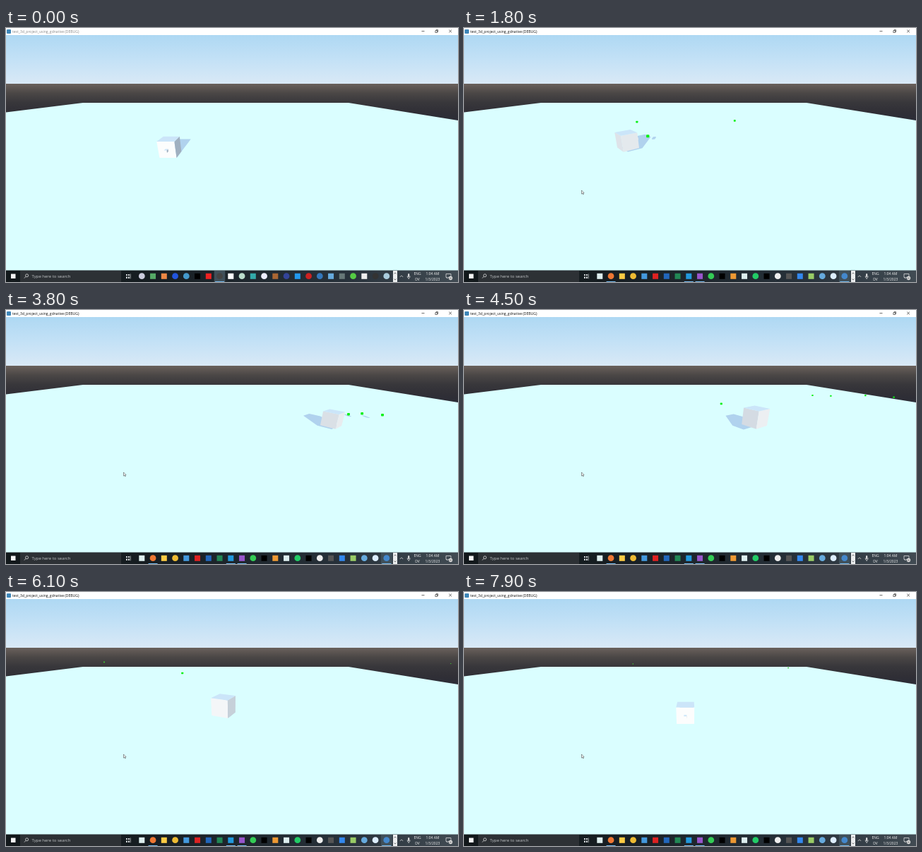
Recreate the animation shown at these times as an HTML page with a canvas. Size 640 px wide and 360 px high, loop 8 s.

```html
<!DOCTYPE html>
<html lang="en">
<head>
<meta charset="utf-8">
<title>Cube shooter</title>
<style>
html, body { margin: 0; width: 100%; height: 100%; overflow: hidden; background: #dafeff; }
svg, canvas { position: absolute; left: 0; top: 0; width: 640px; height: 360px; }
text { font-family: "Open Sans", "Noto Sans", sans-serif; }
</style>
</head>
<body>
<canvas id="stage" width="640" height="360"></canvas>
<svg viewBox="0 0 640 360">
  <linearGradient id="bar">
    <stop offset="0" stop-color="#12181b"/><stop offset=".3" stop-color="#161d21"/>
    <stop offset=".75" stop-color="#27313a"/><stop offset="1" stop-color="#414b53"/>
  </linearGradient>
  <rect width="640" height="10" fill="#fff"/>
  <rect x="1" y="2" width="6" height="6" rx="1" fill="#3d86b8"/>
  <text id="title" x="9" y="6.5" font-size="5.05">test_3d_project_using_gdnative (DEBUG)</text>
  <path d="M588.5 4.5h4M608 3.6h2.6v2.8h-2.8zM609 3.4v-.8h2.6v2.8h-.8M627.2 2.6l3.8 3.8M631 2.6l-3.8 3.8" fill="none" stroke="#333" stroke-width=".7"/>
  <rect y="343.5" width="640" height="16.5" fill="url(#bar)"/>
  <rect x="7" y="348.5" width="6.5" height="6.5" fill="#f4f4f4"/>
  <rect x="20" y="344" width="143" height="16" fill="#2d3135"/>
  <g fill="none" stroke="#ddd" stroke-width=".8">
    <circle cx="29.6" cy="350.8" r="2"/><path d="M28.1 352.3l-2.2 2.3"/>
  </g>
  <text x="36.5" y="354" font-size="6" fill="#c3c6c8">Type here to search</text>
  <path d="M170 349h1.8v2h-1.8zM170 352.5h1.8v2.5h-1.8zM173 349h1.8v2h-1.8zM173 352.5h1.8v2.5h-1.8zM175.8 348.6h.7v6.6h-.7z" fill="#dfe3e5"/>
  <g id="iconsA"></g>
  <g id="iconsB"></g>
  <rect x="548" y="344" width="6" height="16" fill="#eceeef"/>
  <path d="M549.5 348.5l1.5-1.6 1.5 1.6M549.5 355.5l1.5 1.6 1.5-1.6" fill="none" stroke="#444" stroke-width=".7"/>
  <path d="M557.8 353l2.2-2.2 2.2 2.2M568.2 351.5q0 3 2 3t2-3M570.2 354.5v1.6" fill="none" stroke="#e8e8e8" stroke-width=".7"/>
  <rect x="569.2" y="348" width="2" height="5" rx="1" fill="#e8e8e8"/>
  <g font-size="5" fill="#f0f0f0" text-anchor="middle">
    <text x="582.5" y="350">ENG</text><text x="582.5" y="357.6">DV</text>
    <text x="604" y="350">1:04 AM</text><text x="604" y="357.6">1/3/2023</text>
  </g>
  <path d="M623 348.5h7v5h-4l-1.5 1.5v-1.5h-1.5z" fill="none" stroke="#eee" stroke-width=".7"/>
  <circle cx="629.5" cy="354.5" r="2.7" fill="#e8e8e8"/>
  <text x="629.5" y="355.8" font-size="3.4" text-anchor="middle" fill="#222">26</text>
  <path id="cursor" d="M166.5 230v5.2l1.2-1.1.9 1.9.8-.4-.9-1.8h1.6z" fill="#fff" stroke="#333" stroke-width=".5"/>
</svg>
<script>
const LOOP = 8000, STEP = 100, FOCUS_AT = 500;
const CX = 321, CY = 176.5, FOCAL = 238, CAM = 8;   // camera centre, focal length, height
const SIN = .3774, COS = .926;                      // camera tilt
const SLANT = 2.6;                                  // shadow length per unit of height
const BULLET = .42, SPEED = .045, FAR = 80, RAD = Math.PI / 180;
const $ = id => document.getElementById(id);
const ctx = $('stage').getContext('2d');

// the cube's route: time, x, height, z, yaw in degrees
const route = [
  [0, -7.57, 0, 19, 0], [FOCUS_AT, -7.57, 0, 19, 0], [1300, 0, 0, 15, 155],
  [1530, -5, .5, 20.5, 205], [1800, -7.94, .5, 20, 132], [2300, 2, 0, 16, 117],
  [2550, 3.6, 0, 15.7, 31], [2900, 3.6, 0, 15.7, 31], [3800, 13.7, .3, 22.2, 129],
  [4200, 11, .3, 20, 202], [4850, 3, 3.2, 17.1, 230], [5200, 3, 3.4, 17.1, 195],
  [6360, -1.6, .7, 18, 253], [6780, -1.6, 1.2, 18.1, 139], [6900, -1.6, 1.2, 18.1, 55],
  [7900, -.6, 0, 18.4, 0]
];

// every bullet leaves the cube level, along its yaw at that moment
const shots = [
  1310, 1530, 1740, 2270, 2580, 2720, 2810, 3540, 3610, 3680, 3860, 3900, 4200, 4880,
  5650, 6360, 6555, 6780, 6870
].map(from => {
  const [x, y, z, yaw] = poseAt(from);
  return { from, x, y: y + .9, z, vx: SPEED * Math.sin(yaw), vz: -SPEED * Math.cos(yaw) };
});

function poseAt(t) {
  const i = Math.max(1, route.findIndex(p => p[0] >= t));
  const p = route[i - 1], q = route[i];
  const u = (t - p[0]) / (q[0] - p[0]), k = u * u * (3 - 2 * u);
  const [, x, y, z, deg] = p.map((n, j) => n + (q[j] - n) * k);
  return [x, y, z, deg * RAD];
}

function project([x, y, z]) {
  const h = y - CAM, d = Math.max(.5, COS * z - SIN * h);
  return [CX + FOCAL * x / d, CY - FOCAL * (COS * h + SIN * z) / d, d];
}

function poly(points, fill) {
  ctx.beginPath();
  points.forEach(p => ctx.lineTo(p[0], p[1]));
  ctx.closePath();
  ctx.fillStyle = fill;
  ctx.fill();
}

function gradient(y0, y1, colors) {
  const g = ctx.createLinearGradient(0, y0, 0, y1);
  colors.forEach((c, i) => g.addColorStop(i / (colors.length - 1), c));
  ctx.fillStyle = g;
  ctx.fillRect(0, y0, 640, y1 - y0);
}

function world() {
  gradient(10, 79, ['#aed8f3', '#c3e1f6', '#d9e9f6']);
  gradient(79, 132, ['#6a615c', '#4b4746', '#38373b', '#302f36', '#2b2c36']);
  poly([[0, 119.5], [109, 106], [485, 106], [640, 131], [640, 344], [0, 344]], '#dafeff');
}

function corners([x, y, z], w, h, d, yaw) {
  const s = Math.sin(yaw), c = Math.cos(yaw), out = [];
  for (const j of [-1, 1])
    for (const [i, k] of [[-1, 1], [1, 1], [1, -1], [-1, -1]])
      out.push([x + i * w * c + k * d * s, y + j * h, z + i * w * s - k * d * c]);
  return out;
}

const sideColor = light => 'rgb(' + [160, 176, 192].map(n => Math.round(n + (255 - n) * light)) + ')';

function box(mid, w, h, d, yaw) {
  const p = corners(mid, w, h, d, yaw);
  for (let i = 0; i < 4; i++) {
    const j = (i + 1) % 4, a = yaw + i * Math.PI / 2;
    const nx = Math.sin(a), nz = -Math.cos(a);
    if (nx * (p[i][0] + p[j][0]) + nz * (p[i][2] + p[j][2]) >= 0) continue;
    poly([p[i], p[j], p[j + 4], p[i + 4]].map(project), sideColor(Math.max(0, -nz * .97)));
  }
  poly(p.slice(4).map(project), '#cbe5f9');
}

function hull(points) {
  points.sort((a, b) => a[0] - b[0] || a[1] - b[1]);
  const half = list => {
    const out = [];
    for (const p of list) {
      while (out.length > 1) {
        const [a, b] = out.slice(-2);
        if ((b[0] - a[0]) * (p[1] - a[1]) > (b[1] - a[1]) * (p[0] - a[0])) break;
        out.pop();
      }
      out.push(p);
    }
    return out.slice(0, -1);
  };
  return half(points).concat(half(points.slice().reverse()));
}

function shadow(points) {
  poly(hull(points.map(([x, y, z]) => project([x, 0, z + SLANT * y]))), '#b0d2ee');
}

function drawBullet({ pos: [sx, sy, d] }) {
  const px = Math.max(1.2, BULLET * FOCAL / d);
  ctx.save();
  ctx.translate(sx, sy);
  if (px > 5.5) ctx.rotate(.25);
  ctx.fillStyle = px < 2 ? '#3fc832' : '#0af014';
  ctx.beginPath();
  ctx.roundRect(-px / 2, -px * .45, px, px * .9, px * .2);
  ctx.fill();
  ctx.restore();
}

function draw(t) {
  world();
  const [x, y, z, yaw] = poseAt(t);
  const mid = [x, y + 1, z], depth = project(mid)[2];
  const live = shots.filter(s => t > s.from)
    .map(s => {
      const at = [s.x + s.vx * (t - s.from), s.y, s.z + s.vz * (t - s.from)];
      return { at, pos: project(at) };
    })
    .filter(b => b.at[2] > 1 && b.pos[2] < FAR)
    .sort((a, b) => b.pos[2] - a.pos[2]);

  shadow(corners(mid, 1, 1, 1, yaw));
  for (const b of live)
    if (b.at[2] < 27.5) shadow(corners(b.at, .2, .2, .2, .4));

  const dx = Math.sin(yaw), dz = -Math.cos(yaw);
  const gun = () => box([x + dx * 1.2, y + .95, z + dz * 1.2], .15, .15, .22, yaw);
  const facing = dx * (x + dx) + dz * (z + dz) < 0;
  live.filter(b => b.pos[2] >= depth).forEach(drawBullet);
  if (!facing) gun();
  box(mid, 1, 1, 1, yaw);
  if (facing) gun();
  live.filter(b => b.pos[2] < depth).forEach(drawBullet);

  const focused = t >= FOCUS_AT;
  $('title').setAttribute('fill', focused ? '#111' : '#888');
  $('cursor').style.display = $('iconsB').style.display = focused ? '' : 'none';
  $('iconsA').style.display = focused ? 'none' : '';
}

// one plain mark per taskbar slot: o = circle, s = square
function icons(id, list, active, running) {
  let html = `<rect x="${184.5 + active * 15.75}" y="344" width="15.5" height="16" fill="#40505a"/>`;
  list.split(' ').forEach((item, i) => {
    const x = 192.3 + i * 15.75, fill = '#' + item.slice(1);
    html += item[0] === 'o'
      ? `<circle cx="${x}" cy="351.7" r="4.4" fill="${fill}"/>`
      : `<rect x="${x - 4}" y="347.8" width="8" height="8" fill="${fill}"/>`;
    if (running.includes(i)) html += `<rect x="${x - 6.5}" y="359" width="13" height="1" fill="#76b9ed"/>`;
  });
  $(id).innerHTML = html;
}

icons('iconsA', 'occd s5a6 se84 o25d o49c s000 se22 o444 sfff obdc s3aa oeef sa63 o349 s29e oc22 o37b s6ad s677 o5c4 seee o333 oacd', 7, [7]);
icons('iconsB', 'sdee oe73 sfc4 oeb3 s49d sd22 s26b s285 s29d s95c o3c5 s000 se93 sdee o2c6 s000 oeee s555 s38e s9c6 o6ad odef o48c', 22, [1, 8, 9, 22]);

const start = performance.now();
function tick(now) {
  const t = Math.max(0, now - start) % LOOP;
  draw(Math.floor(t / STEP) * STEP);
  requestAnimationFrame(tick);
}
draw(0);
requestAnimationFrame(tick);
</script>
</body>
</html>
```
